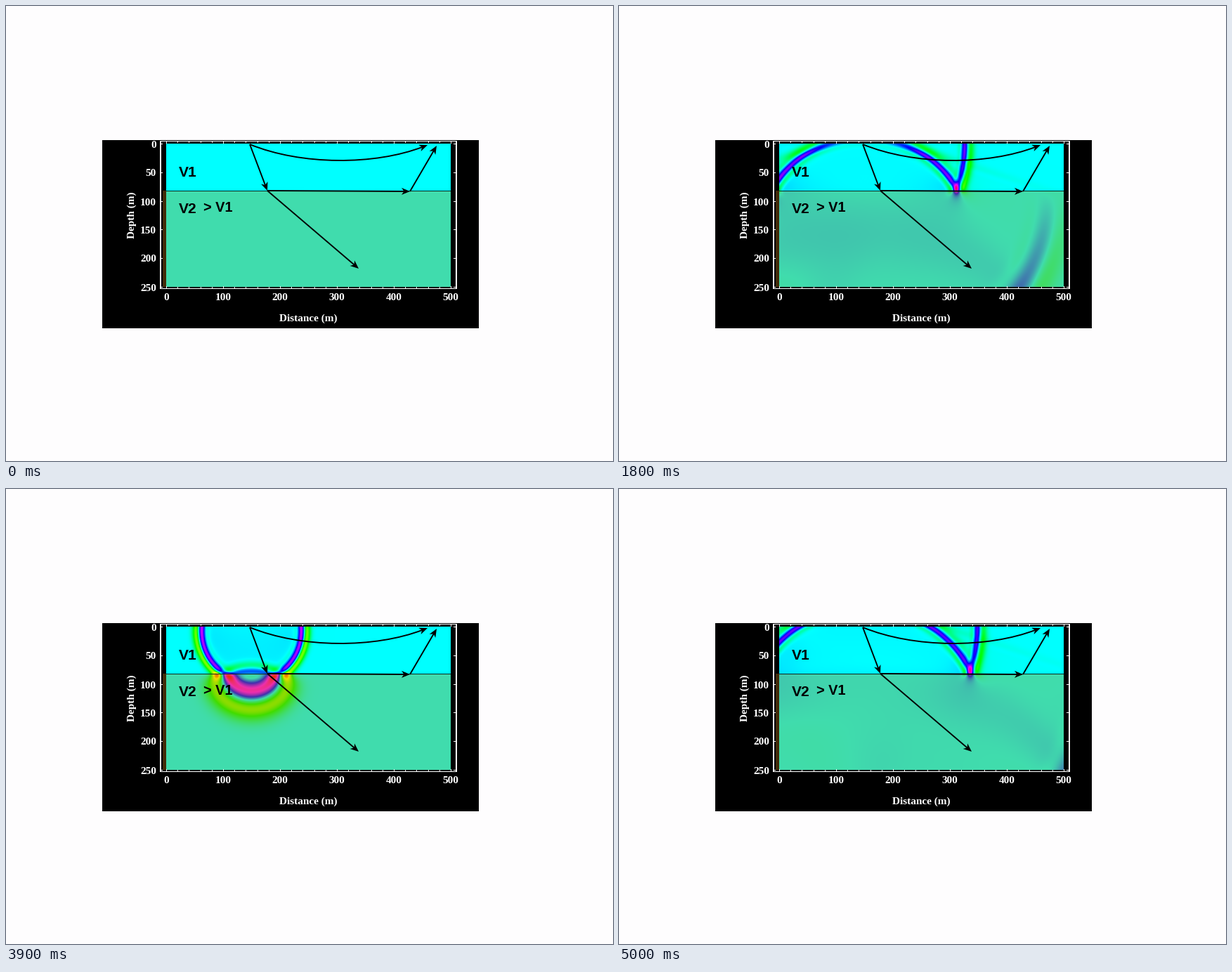
These frames come from a looping animation (864 px wide and 648 px high, 5100 ms). A matplotlib script:

```python
import numpy as np
import matplotlib.pyplot as plt
from matplotlib.animation import FuncAnimation
from matplotlib.colors import hsv_to_rgb
from matplotlib.patches import PathPatch, Polygon, Rectangle
from matplotlib.path import Path

W, H, DPI = 864, 648, 100
PX = 72 / DPI
LEFT, RIGHT, TOP, BOTTOM = 228, 633, 196, 400
INTERFACE = 263
SOURCE = (349, 202)
FRAMES, STEP_MS = 51, 100

# Wave model: lengths in pixels, upper layer speed is 1
PAD = 90
DT = 0.2
SIGMA = 4.5
DELAY = 4 * SIGMA
LAG = 2.5
FAST = 3.2
RAMP = (264, 273)
PEAK = 0.4

# Wavefront radius by frame, for the two shots in a loop
SHOT_1 = ([2, 7, 14, 29], [-9, 36, 108, 243])
SHOT_2 = ([33, 34, 39, 42, 50], [18, 27, 72, 108, 162])
HELD = {19, 21, 23, 25, 29, 33}


def front_radius(k):
    if k < 2 or k in (30, 31):
        return None
    if k in HELD:
        k -= 1
    shot = SHOT_1 if k < 30 else SHOT_2
    return round(float(np.interp(k, *shot)), 2)


def pulse(t):
    s = (t - DELAY) / SIGMA
    return (1 + 0.5 * s - s * s) * np.exp(-s * s / 2)


def simulate(radii):
    """Scalar wave field in the panel at each wavefront radius."""
    ny, nx = BOTTOM - TOP + 2 * PAD, RIGHT - LEFT + 2 * PAD
    y, x = np.arange(ny), np.arange(nx)
    speed = np.interp(y + TOP - PAD, RAMP, [1, FAST])
    k2 = ((speed * DT) ** 2)[1:-1, None]
    dx = np.maximum(0, np.maximum(PAD - x, x - (nx - 1 - PAD)))
    dy = np.maximum(0, np.maximum(PAD - y, y - (ny - 1 - PAD)))
    sponge = np.exp(-(0.003 * dx[None, :]) ** 2 - (0.003 * dy[:, None]) ** 2)
    sx, sy = SOURCE[0] - LEFT + PAD, SOURCE[1] - TOP + PAD

    u, old = np.zeros((ny, nx)), np.zeros((ny, nx))
    due = {round((r + DELAY + LAG) / DT): r for r in radii}
    fields = {}
    for n in range(max(due) + 1):
        if n in due:
            fields[due[n]] = u[PAD:-PAD, PAD:-PAD].copy()
        lap = (u[2:, 1:-1] + u[:-2, 1:-1] + u[1:-1, 2:]
               + u[1:-1, :-2] - 4 * u[1:-1, 1:-1])
        new = 2 * u - old
        new[1:-1, 1:-1] += k2 * lap
        new[sy, sx] += pulse(n * DT) * DT ** 2
        new *= sponge
        old, u = u * sponge, new
    return fields


def colorize(field):
    hue = np.clip(0.5 + field, 0.02, 0.98)
    one = np.ones_like(hue)
    rgb = hsv_to_rgb(np.dstack([hue, one, one]))
    rock = INTERFACE - TOP
    rgb[rock:] = 0.68 * rgb[rock:] + np.array([64, 47, 0]) / 255
    return np.clip(rgb, 0, 1)


def build_pictures():
    radii = {front_radius(k) for k in range(FRAMES)} - {None}
    fields = simulate(radii)
    gain = PEAK / fields[36.0].max()
    pics = {r: colorize(f * gain) for r, f in fields.items()}
    pics[None] = colorize(np.zeros((BOTTOM - TOP, RIGHT - LEFT)))
    return pics


fig = plt.figure(figsize=(W / DPI, H / DPI), dpi=DPI, facecolor="#fefdfe")
ax = fig.add_axes([0, 0, 1, 1])
ax.axis("off")


def box(x0, y0, x1, y1, color, z, smooth=False):
    ax.add_patch(Rectangle((x0, y0), x1 - x0, y1 - y0, fc=color, ec="none",
                           antialiased=smooth, zorder=z))


def label(x, y, s, size=15.2, font="Liberation Serif", color="white", **kw):
    style = dict(ha="center", va="baseline")
    style.update(kw)
    ax.text(x, y, s, fontsize=size * PX, family=font, weight="bold",
            color=color, zorder=8, **style)


def head(tip, tail):
    tip, tail = np.array(tip, float), np.array(tail, float)
    d = (tip - tail) / np.hypot(*(tip - tail))
    n = np.array([-d[1], d[0]])
    pts = [tip, tip - 12 * d + 5 * n, tip - 8.5 * d, tip - 12 * d - 5 * n]
    ax.add_patch(Polygon(pts, fc="black", ec="none", zorder=7))


def arrow(*pts):
    curve = Path.LINETO if len(pts) == 2 else Path.CURVE4
    codes = [Path.MOVETO] + [curve] * (len(pts) - 1)
    tip, prev = np.array(pts[-1], float), np.array(pts[-2], float)
    stop = tip + (prev - tip) / np.hypot(*(prev - tip)) * 7
    ax.add_patch(PathPatch(Path(list(pts[:-1]) + [stop], codes), fc="none",
                           ec="black", lw=1.9 * PX, capstyle="butt", zorder=7))
    head(pts[-1], pts[-2])


def draw_axes():
    box(137.3, 190.8, 672.6, 458.6, "black", 1, smooth=True)
    box(223, INTERFACE, LEFT, BOTTOM, "#422b08", 2)
    box(LEFT, INTERFACE, RIGHT, INTERFACE + 1, "#0c2a22", 4)
    for x in (219, 640):
        box(x, 192, x + 1.5, 403, "white", 5)
    for y in (192, 402):
        box(219, y, 641, y + 1, "white", 5)
    for m in range(0, 501, 20):
        x = round(LEFT + m * (RIGHT - LEFT) / 500)
        size = 4 if m % 100 == 0 else 3
        box(x, 192, x + 1, 192 + size, "white", 5)
        box(x, 403 - size, x + 1, 403, "white", 5)
    for m in range(0, 251, 50):
        y = round(TOP + 0.5 + m * 0.812)
        box(219, y, 223, y + 1, "white", 5)
        box(637, y, 641, y + 1, "white", 5)
        label(214, y + 5.5, str(m), ha="right")
    for m in range(0, 501, 100):
        label(LEFT + m * 0.81, 419, str(m))
    label(430.5, 449, "Distance (m)")
    label(179.5, 298, "Depth (m)", rotation=90, va="center")


def draw_rays():
    shot, hit, leave = (347, 197), (372, 263), (575, 264)
    arrow(shot, hit)
    arrow(hit, leave)
    arrow(leave, (613, 199))
    arrow(hit, (502, 374))
    arrow(shot, (420, 227), (525, 227), (600, 198))
    for x, y, s, size in ((246, 243, "V1", 21), (246, 295, "V2", 21),
                          (281, 293, "> V1", 20)):
        label(x, y, s, size, "Liberation Sans", "black", ha="left")


pictures = build_pictures()
screen = ax.imshow(pictures[None], extent=(LEFT, RIGHT, BOTTOM, TOP),
                   interpolation="nearest", aspect="auto", zorder=3)
draw_axes()
draw_rays()
ax.set_xlim(0, W)
ax.set_ylim(H, 0)


def update(k):
    screen.set_data(pictures[front_radius(k)])
    return [screen]


anim = FuncAnimation(fig, update, frames=FRAMES, interval=STEP_MS,
                     repeat=True, repeat_delay=0, blit=False)
plt.show()
```
